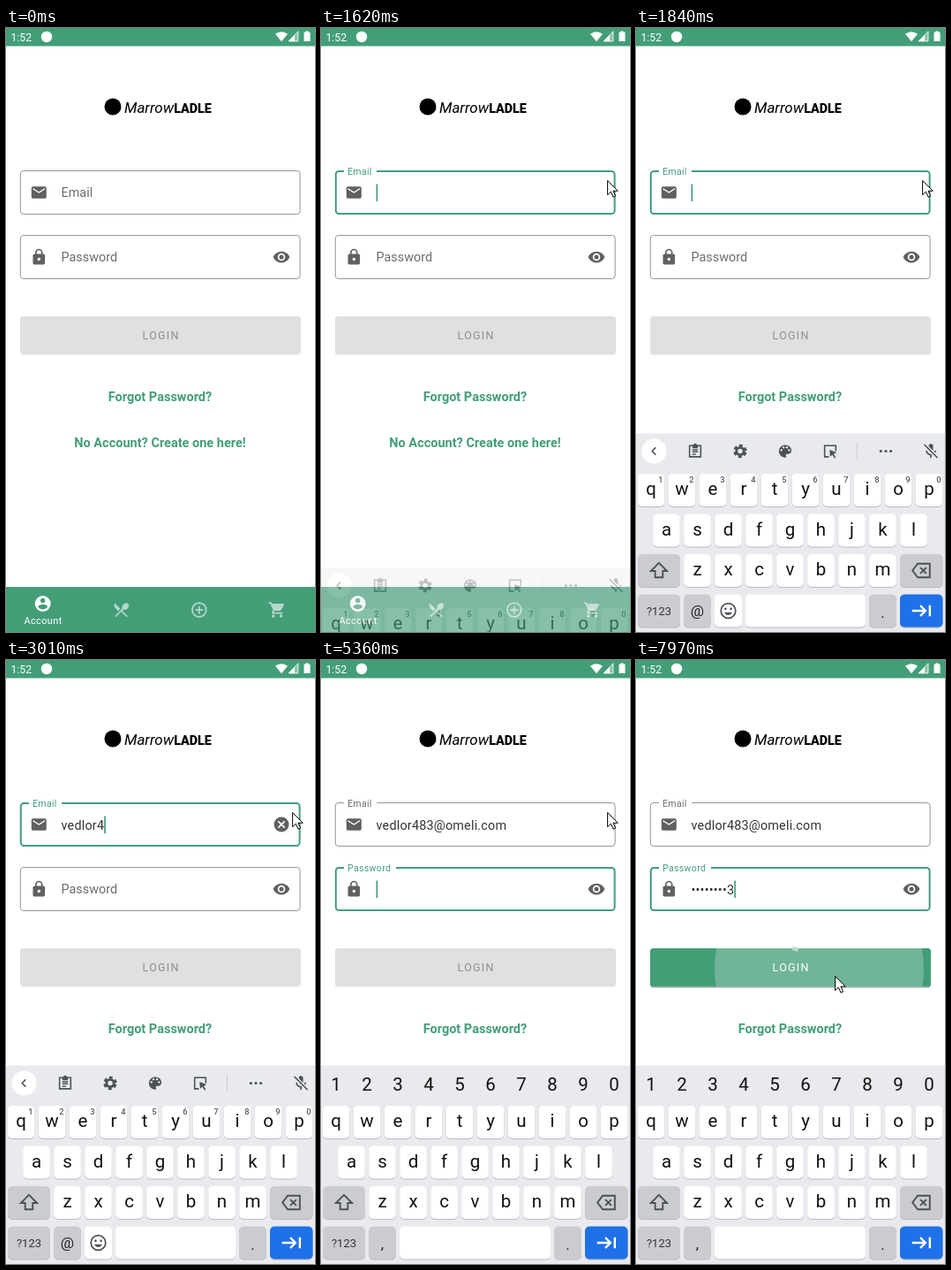
An HTML page that plays this animation: 350x683 px, repeating every 7990 ms.

```html
<!DOCTYPE html>
<html lang="en">
<head>
<meta charset="utf-8">
<title>Login</title>
<style>
html, body { margin: 0; width: 100%; height: 100%; overflow: hidden; background: #fff; }
svg { display: block; }
#stage { width: 100vw; height: 100vh; font-family: Roboto, "Open Sans", sans-serif; }
text { white-space: pre; }
.typed { font-size: 14.4px; letter-spacing: .2px; fill: #333; }
.mid { text-anchor: middle; }
.link { font-size: 14.5px; font-weight: 700; fill: #439e78; text-anchor: middle; }
.key { font-size: 20.5px; fill: #111; text-anchor: middle; }
.mark { font-size: 17px; fill: #222; text-anchor: middle; }
.tiny { font-size: 9.4px; font-weight: 500; fill: #55585d; text-anchor: middle; }
.line { fill: none; stroke: currentColor; stroke-width: 2; }
</style>
</head>
<body>
<svg id="stage" viewBox="0 0 350 683">
  <defs><clipPath id="btnClip"><rect x="16" y="326" width="318" height="43.5" rx="3.5"/></clipPath></defs>
  <rect width="350" height="683" fill="#fff"/>
  <g id="status" fill="#fff">
    <rect width="350" height="20.5" fill="#439e78"/>
    <text x="5.4" y="14.5" font-size="12.3">1:52</text>
    <circle cx="46" cy="10" r="6.2"/>
    <path d="M305 6.8Q312 1.5 319 6.8L312 15.2Z"/>
    <path d="M331 3.8V15H320Z" opacity=".4"/>
    <path d="M327 7.9V15H320Z"/><path d="M331 3.8V15H320Z" fill="none" stroke="#fff" stroke-width=".8"/>
    <path d="M337.5 4.8h2V3.4h3v1.4h2V15h-7z"/>
  </g>
  <g id="brand">
    <circle cx="121" cy="89" r="9.5"/>
    <text x="134" y="95.5" font-size="17"><tspan font-style="italic">Marrow</tspan><tspan font-size="14.3" font-weight="900">LADLE</tspan></text>
  </g>
  <g id="form"></g>
  <g id="login">
    <rect id="shade" x="16" y="327.5" width="318" height="43.5" rx="3.5" fill="#000" opacity="0"/>
    <rect id="btn" x="16" y="326" width="318" height="43.5" rx="3.5"/>
    <circle id="ripple" fill="#fff" fill-opacity=".24" clip-path="url(#btnClip)"/>
    <path id="spin" d="M177 323.5l7.5 1.2-1.5 5.3-6-2z" fill="#c5dcd1" opacity="0"/>
    <text id="btnText" class="mid" x="175.6" y="352.4" font-size="12.5" letter-spacing="1.25">LOGIN</text>
  </g>
  <text class="link" x="174.5" y="422.4">Forgot Password?</text>
  <text class="link" x="174.5" y="474.2">No Account? Create one here!</text>
  <g id="nav"></g>
  <g id="kb"></g>
  <path id="mouse" d="M0 0v16.2l3.8-3.5 2.6 6 2.6-1.1-2.6-5.9h5.3z" fill="#fff" stroke="#000" stroke-width="1"/>
</svg>
<script>
const LOOP = 7990, GREEN = '#439e78', GREY = '#606060';
const USER = 'vedlor483', MAIL = USER + '@omeli.com';
const MAIL_AT = [2110, 2310, 2400, 2520, 2690, 2810, 3010, 3140, 3280, 3480,
  3770, 3910, 3990, 4160, 4220, 4470, 4780, 4930, 4980];
const PASS_AT = [5680, 5880, 6090, 6170, 6340, 6420, 6660, 6720, 6790];
const FOCUS_MAIL = 1290, FOCUS_PASS = 5190, KEYS_SWAP = 5250;

const $ = id => document.getElementById(id);
const set = (el, attrs) => { for (const k in attrs) el.setAttribute(k, attrs[k]); };
const clamp = x => Math.max(0, Math.min(1, x));
const mix = (a, b, p) => a + (b - a) * p;
const span = (t, a, b) => clamp((t - a) / (b - a));
const smooth = p => p * p * (3 - 2 * p);
const out = p => 1 - (1 - p) ** 2;

// rows of [time, value, value...], eased between rows
function track(rows, t, ease) {
  let i = 0;
  while (i < rows.length - 2 && t >= rows[i + 1][0]) i++;
  const a = rows[i], b = rows[i + 1], p = ease(span(t, a[0], b[0]));
  return a.slice(1).map((v, k) => mix(v, b[k + 1], p));
}

const ICONS = {
  mail: '<rect x="2" y="4" width="20" height="16" rx="2"/><path fill="#fff" d="M4 6l8 5 8-5v2l-8 5-8-5z"/>',
  lock: '<rect x="4" y="8" width="16" height="14" rx="2"/><path class="line" d="M8 9V6a4 4 0 0 1 8 0v3"/><circle cx="12" cy="15" r="2" fill="#fff"/>',
  eye: '<path d="M12 4.5C7 4.5 2.73 7.61 1 12c1.73 4.39 6 7.5 11 7.5s9.27-3.11 11-7.5c-1.73-4.39-6-7.5-11-7.5z"/><circle cx="12" cy="12" r="4" fill="none" stroke="#fff" stroke-width="2"/>',
  clear: '<circle cx="12" cy="12" r="10"/><path d="M7.7 7.7l8.6 8.6M16.3 7.7l-8.6 8.6" stroke="#fff" stroke-width="2"/>',
  user: '<circle cx="12" cy="12" r="10"/><g fill="#439e78"><circle cx="12" cy="8" r="3"/><path d="M12 19.2c-2.5 0-4.71-1.28-6-3.22.03-1.99 4-3.08 6-3.08s5.97 1.09 6 3.08c-1.29 1.94-3.5 3.22-6 3.22z"/></g>',
  food: '<path d="M8.1 13.34l2.83-2.83L3.91 3.5c-1.56 1.56-1.56 4.09 0 5.66l4.19 4.18zm6.78-1.81c1.53.71 3.68.21 5.27-1.38 1.91-1.91 2.28-4.65.81-6.12-1.46-1.46-4.2-1.1-6.12.81-1.59 1.59-2.09 3.74-1.38 5.27L3.7 19.87l1.41 1.41L12 14.41l6.88 6.88 1.41-1.41L13.41 13l1.47-1.47z"/>',
  plus: '<circle class="line" cx="12" cy="12" r="9"/><path class="line" d="M12 7v10M7 12h10"/>',
  cart: '<circle cx="7" cy="20" r="2"/><circle cx="17" cy="20" r="2"/><path class="line" d="M1 3h2.6l4.3 9-1.7 3q-.6 1 1 1H19"/><path d="M5.2 4h14.8q1.6.2.8 1.6l-3.5 6.4q-.6 1-1.8 1H8z"/>',
  clip: '<path class="line" d="M4 4h16v16H4zM8 10h8M8 13h8M8 16.5h5"/><path d="M8 4q1 0 1.2-1a2.9 2.9 0 0 1 5.6 0q.2 1 1.2 1v4H8z"/>',
  gear: '<circle class="line" cx="12" cy="12" r="5.3" style="stroke-width:3.6"/><circle class="line" cx="12" cy="12" r="8.2" stroke-dasharray="5 3.586" stroke-dashoffset="-1.8" style="stroke-width:3"/>',
  paint: '<path d="M12 3c-4.97 0-9 4.03-9 9s4.03 9 9 9c.83 0 1.5-.67 1.5-1.5 0-.39-.15-.74-.39-1.01-.23-.26-.38-.61-.38-.99 0-.83.67-1.5 1.5-1.5H16c2.76 0 5-2.24 5-5 0-4.42-4.03-8-9-8z"/><g fill="#e8eaee"><circle cx="6.5" cy="10.5" r="1.5"/><circle cx="9.5" cy="6.5" r="1.5"/><circle cx="14.5" cy="6.5" r="1.5"/><circle cx="17.5" cy="10.5" r="1.5"/></g>',
  hand: '<path class="line" d="M10 20H4V4h16v8"/><path d="M11 10l10 4-4 2 3 5-2 1-3-5-3 3z"/>',
  dots: '<circle cx="4" cy="12" r="2.2"/><circle cx="12" cy="12" r="2.2"/><circle cx="20" cy="12" r="2.2"/>',
  mic: '<rect x="9" y="2" width="6" height="12" rx="3"/><path class="line" d="M6 11a6 6 0 0 0 12 0M12 17v4"/><path d="M3 3l18 18" stroke="#e8eaee" stroke-width="5"/><path class="line" d="M3 3l18 18"/>',
  back: '<path class="line" d="M14.5 6.5L9 12l5.5 5.5"/>',
  shift: '<path class="line" d="M12 3L2.5 12.5H7.5V20h9v-7.5h5z"/>',
  erase: '<path class="line" d="M8 4h14v16H8L2 12zM11 8.5l7 7M18 8.5l-7 7"/>',
  smile: '<circle class="line" cx="12" cy="12" r="9.5"/><circle cx="8.5" cy="9.5" r="1.5"/><circle cx="15.5" cy="9.5" r="1.5"/><path d="M7 14h10a5.3 5.3 0 0 1-10 0z"/>',
  tab: '<path class="line" d="M1 12h15M10.5 6l6 6-6 6M21.5 5.5v13" style="stroke-width:2.4"/>'
};
const icon = (name, x, y, color, size = 20.4, extra = '') =>
  `<svg x="${x - size / 2}" y="${y - size / 2}" width="${size}" height="${size}" viewBox="0 0 24 24" fill="${color}" color="${color}" ${extra}>${ICONS[name]}</svg>`;
const label = (s, x, y, cls, more = '') => `<text class="${cls}" x="${x}" y="${y}" ${more}>${s}</text>`;

function buildField(id, title, y, glyph) {
  return `<g><rect id="${id}Box" rx="3.5" fill="none"/>
    <rect id="${id}Gap" y="${y - 4}" height="9" fill="#fff"/>
    <text id="${id}Label">${title}</text>
    ${icon(glyph, 37.3, y + 25, GREY)}
    <text id="${id}Text" class="typed" x="62.5" y="${y + 30.5}"></text>
    <rect id="${id}Caret" y="${y + 15.5}" width="1.7" height="19.5" fill="${GREEN}"/></g>`;
}
$('form').innerHTML = buildField('mail', 'Email', 161, 'mail') + buildField('pass', 'Password', 234, 'lock') +
  `<g id="clear">${icon('clear', 312, 186, GREY)}</g>` + icon('eye', 312, 259, GREY);

$('nav').innerHTML = `<rect y="632" width="350" height="51" fill="${GREEN}"/>` +
  icon('user', 41.7, 651, '#fff', 21.5) + label('Account', 42, 674.3, 'mid', 'fill="#fff" font-size="11" letter-spacing=".35"') +
  ['food', 'plus', 'cart'].map((n, i) => icon(n, 130.5 + i * 88.3, 658, '#fff', 21, 'opacity=".6"')).join('');

function buildKeys() {
  const dark = '#4d5156', soft = '#cbccd2';
  const cap = (x, y, w, fill = '#fff') =>
    `<rect x="${x}" y="${y + 1}" width="${w}" height="37" rx="5" fill="#b9bbc1"/><rect x="${x}" y="${y}" width="${w}" height="37" rx="5" fill="${fill}"/>`;
  const row = (chars, x, y) => [...chars].map((c, i) =>
    cap(x + i * 35 - 15.3, y, 30.6) + label(c, x + i * 35, y + 24, 'key')).join('');
  const digits = (cls, dx, y) => [...'1234567890'].map((d, i) => label(d, 17 + i * 35 + dx, y, cls)).join('');
  return '<rect y="458.5" width="350" height="226" fill="#e8eaee"/>' +
    row('qwertyuiop', 17, 504) + row('asdfghjkl', 34.5, 549.5) + row('zxcvbnm', 69.5, 595) +
    cap(2, 595, 48, soft) + icon('shift', 26, 613.5, dark, 23) +
    cap(299, 595, 48.5, soft) + icon('erase', 323, 613.5, dark, 23.5) +
    cap(2, 640.5, 48, soft) + label('?123', 26, 664, 'mid', 'font-size="13" fill="#333"') +
    cap(54.2, 640.5, 30.6, soft) +
    cap(264, 640.5, 31, soft) + label('.', 279.5, 667, 'mark') +
    cap(299, 640.5, 48.5, '#1f71e8') + icon('tab', 323.5, 659, '#fff', 23.5) +
    `<g id="mailKeys">${digits('tiny', 11, 514.3)}<circle cx="20.5" cy="478.5" r="14" fill="#fff"/>` +
    ['back', 'clip', 'gear', 'paint', 'hand'].map((n, i) => icon(n, i ? 16 + i * 51 : 20.5, 478.5, dark, i ? 19 : 18)).join('') +
    '<path d="M250.5 469v19" stroke="#c9ccd1"/>' + icon('dots', 283, 478.5, dark, 17) + icon('mic', 334, 478.5, dark, 20) +
    label('@', 69.5, 665, 'mark') +
    cap(89, 640.5, 31) + icon('smile', 104.5, 659, dark, 21) + cap(124, 640.5, 136) + '</g>' +
    `<g id="passKeys">${digits('key', 0, 487)}${label(',', 69.5, 666, 'mark')}${cap(89, 640.5, 171)}</g>`;
}
$('kb').innerHTML = buildKeys();

const MOUSE = [[560, 299, 315], [820, 256, 240], [980, 262, 192], [1260, 324.6, 172.5], [7380, 324.6, 172.5], [7630, 225.6, 357.5]];
const KEYBOARD = [[1570, 225, 0], [1620, 152, .35], [1720, 152, .35], [1840, 0, 1], [LOOP, 0, 1]];

function drawField(id, y, shown, focused, p, gap, caret) {
  // the stroke lies inside the field's edge
  const stroke = focused ? 2 : 1, inset = stroke / 2;
  set($(id + 'Box'), {
    x: 15.8 + inset, y: y + inset, width: 317.8 - stroke, height: 50 - stroke,
    stroke: focused ? GREEN : '#969696', 'stroke-width': stroke
  });
  set($(id + 'Gap'), { x: mix(26 + gap / 2, 26, p), width: gap * p });
  set($(id + 'Label'), {
    x: mix(62.5, 30, p), y: y + mix(30, 5, p), 'font-size': mix(14.4, 10.6, p),
    'letter-spacing': mix(0, .3, p), fill: focused ? GREEN : '#6c6c6c'
  });
  const text = $(id + 'Text');
  if (text.textContent !== shown) text.textContent = shown;
  const w = shown ? text.getComputedTextLength() : 0;
  set($(id + 'Caret'), { x: 62.5 + w, opacity: focused && caret ? 1 : 0 });
}

function draw(t) {
  const typed = at => at.filter(x => t >= x).length;
  const nMail = typed(MAIL_AT), nPass = typed(PASS_AT);
  const onPass = t >= FOCUS_PASS, onMail = t >= FOCUS_MAIL && !onPass;

  // blink restarts with every key and focus change
  const last = Math.max(...[1410, 5210, ...MAIL_AT, ...PASS_AT].filter(x => x <= t), 0);
  const caret = last > 0 && (t - last) % 1000 < 500;

  drawField('mail', 161, MAIL.slice(0, nMail), onMail, smooth(span(t, 1390, 1540)), 37, caret);
  drawField('pass', 234, nPass ? '•'.repeat(nPass - 1) + USER[nPass - 1] : '', onPass,
    smooth(span(t, FOCUS_PASS, 5350)), 59, caret);
  set($('clear'), { opacity: Math.min(span(t, 2060, 2160), 1 - span(t, 5190, 5290)) });

  const ready = nPass > 0;
  set($('btn'), { fill: ready ? GREEN : '#dfe1e0' });
  set($('shade'), { opacity: ready ? .22 : 0 });
  set($('btnText'), { fill: ready ? '#fff' : '#8e908f' });
  const r = out(span(t, 7780, 7970));
  set($('ripple'), { cx: mix(227, 207.5, r), cy: mix(357, 349, r), r: t < 7780 ? 0 : mix(30, 118.5, r) });
  set($('spin'), { opacity: t >= 7965 ? .85 : 0 });

  const [drop, alpha] = track(KEYBOARD, t, out);
  set($('kb'), { transform: `translate(0 ${drop})`, opacity: alpha });
  set($('mailKeys'), { display: t < KEYS_SWAP ? 'inline' : 'none' });
  set($('passKeys'), { display: t < KEYS_SWAP ? 'none' : 'inline' });

  const [mx, my] = track(MOUSE, t, smooth);
  set($('mouse'), { transform: `translate(${mx} ${my})`, opacity: t < 560 ? 0 : 1 });
}

const start = performance.now();
function tick() {
  draw((performance.now() - start) % LOOP);
  requestAnimationFrame(tick);
}
tick();
</script>
</body>
</html>
```
